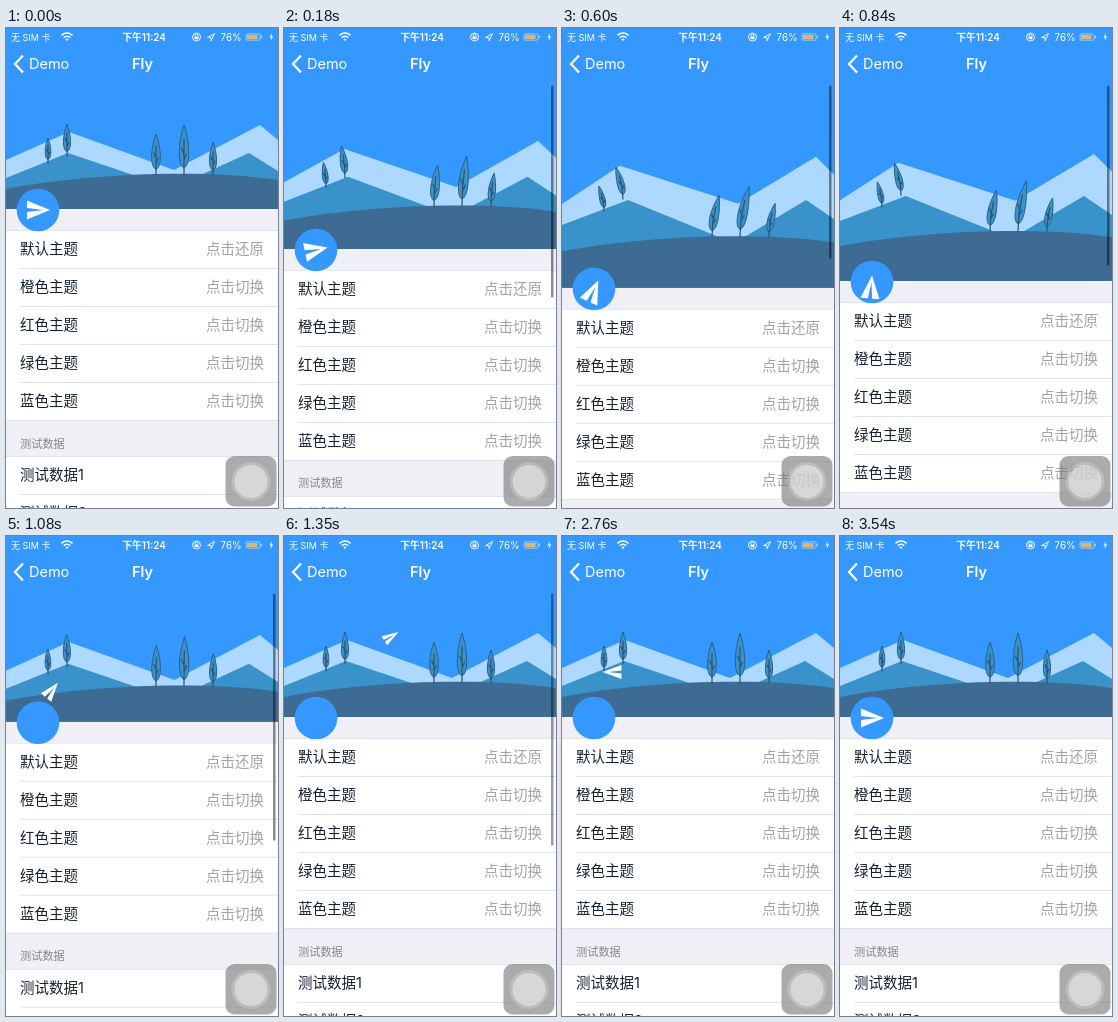
An HTML page for the animation above (3.57 s loop, 272 px wide and 480 px high).

```html
<!DOCTYPE html>
<html lang="zh-CN">
<head>
<meta charset="utf-8">
<title>Fly</title>
<style>
html, body { margin: 0; width: 100%; height: 100%; overflow: hidden; background: #f0eff6; }
svg { display: block; width: 272px; height: 480px; }
text { font-family: Inter, "Noto Sans CJK SC", "Noto Sans CJK", sans-serif; }
.row { font-size: 14.5px; fill: #15222e; }
.action { font-size: 14.5px; fill: #a1a3a7; text-anchor: end; }
.caption { font-size: 11.2px; fill: #85868b; }
.status { font-size: 9px; fill: #fff; }
.nav { font-size: 14.5px; fill: #fff; }
.line { stroke: #dde4ec; stroke-width: 1; }
.tree { fill: #3a92cb; stroke: #2c5f86; stroke-width: 1; stroke-linejoin: round; }
.trunk { fill: none; stroke: #2c5272; stroke-width: 1.2; stroke-linecap: round; }
</style>
</head>
<body>
<svg id="stage" viewBox="0 0 272 480">
  <rect width="272" height="480" fill="#f0eff6"/>
  <g id="list"></g>
  <rect id="sky" width="272" height="181" fill="#3498ff"/>
  <path id="far" fill="#add8ff"/>
  <path id="mid" fill="#3a92cb"/>
  <path id="hill" fill="#3d6b94"/>
  <g id="trees"></g>
  <circle id="button" cx="32" cy="182" r="21.3" fill="#3498ff"/>
  <path id="plane" fill="#fff" d="M2 21 23 12 2 3v7l15 2-15 2z"/>
  <rect id="bar" x="267" y="57.5" width="2.5" rx="1.25" fill="#000"/>

  <text class="status" x="5" y="12.5" textLength="">无 SIM 卡</text>
  <g fill="none" stroke="#fff" stroke-width="1.5">
    <path d="M55.5 7.3Q61 2.8 66.5 7.3M57.7 9.7Q61 7 64.3 9.7"/>
    <path d="M59.4 11.2 61 13l1.6-1.8q-1.6-1.2-3.2 0z" fill="#fff" stroke="none"/>
  </g>
  <text class="status" x="138" y="12.5" text-anchor="middle" style="font-size:9.8px;font-weight:600">下午11:24</text>
  <g fill="none" stroke="#fff" stroke-width=".9">
    <circle cx="190.5" cy="9" r="4"/>
    <path d="M189 8.6V7.6a1.5 1.5 0 0 1 3 0v1"/>
    <path d="M188.6 8.5h3.8v2.7h-3.8z" fill="#fff" stroke="none"/>
    <path d="M201.5 9.6 208.5 5.6 205 12.8V9.6z"/>
  </g>
  <text class="status" x="214.5" y="12.5" style="font-size:9.8px">76%</text>
  <rect x="240" y="5.8" width="14" height="6.4" rx="1.2" fill="none" stroke="#cfd8dd" stroke-width=".7"/>
  <rect x="241" y="6.8" width="10.5" height="4.4" fill="#d9b77a"/>
  <rect x="254.7" y="7.8" width="1.2" height="2.4" fill="#cfd8dd"/>
  <path d="M266 5 263.4 9.4h1.9L264.4 13 267.2 8.4h-1.9z" fill="#fff"/>
  <path d="M17 27.5 9 36l8 8.5" fill="none" stroke="#fff" stroke-width="2.2"/>
  <text class="nav" x="23" y="41">Demo</text>
  <text class="nav" x="136.5" y="41" text-anchor="middle" font-weight="600">Fly</text>

  <rect x="219.5" y="428" width="51" height="50.5" rx="9" fill="#808080" fill-opacity=".66"/>
  <circle cx="245" cy="453.5" r="19.5" fill="#fff" fill-opacity=".2"/>
  <circle cx="245" cy="453.5" r="16.5" fill="#fff" fill-opacity=".4"/>
</svg>
<script>
const LOOP = 3570, STEP = 30, FULL = 77, RELEASE = 813;
const $ = id => document.getElementById(id);
const lerp = (a, b, k) => a + (b - a) * k;

function add(parent, tag, attrs, text) {
  const el = document.createElementNS('http://www.w3.org/2000/svg', tag);
  for (const key in attrs) el.setAttribute(key, attrs[key]);
  if (text) el.textContent = text;
  parent.append(el);
  return el;
}

function section(top, labels, actions) {
  const list = $('list'), n = labels.length;
  add(list, 'rect', { y: top, width: 272, height: n * 38, fill: '#fff' });
  labels.forEach((label, i) => {
    const y = top + i * 38;
    add(list, 'text', { class: 'row', x: 14, y: y + 24 }, label);
    if (actions) add(list, 'text', { class: 'action', x: 258, y: y + 24 }, i ? '点击切换' : '点击还原');
    if (i) add(list, 'path', { class: 'line', d: `M14 ${y}.5H272` });
  });
  for (const y of [top, top + n * 38]) add(list, 'path', { class: 'line', d: `M0 ${y}.5H272` });
}
section(202, ['默认', '橙色', '红色', '绿色', '蓝色'].map(s => s + '主题'), true);
add($('list'), 'text', { class: 'caption', x: 14, y: 419.5 }, '测试数据');
section(428, ['测试数据1', '测试数据2']);

// Ridge points: x, y at rest, then x, y when pulled.
const FAR = [[0, 132, 0, 175], [63, 104, 58, 137], [168, 142, 176, 175], [254, 97, 254, 128], [272, 112, 272, 146]];
const MID = [[0, 150, 0, 196], [62, 125, 66, 171], [166, 160, 172, 214], [243, 125, 244, 171], [272, 143, 272, 190]];

// x, base at rest, base when pulled, height, lean, half width
const TREES = [
  [42, 135, 182, 25, -5, 3], [61, 128, 170, 32, -7, 3.8],
  [150, 147, 207, 41, 7, 4.6], [178, 147, 207, 50, 9, 5], [207, 147, 207, 33, 6, 3.8]
].map(spec => ({
  spec,
  leaf: add($('trees'), 'path', { class: 'tree' }),
  trunk: add($('trees'), 'path', { class: 'trunk' })
}));

// time, x, y, angle, scale x, scale y
const FLIGHT = [
  [0, 32.5, 182, 0, 1.1, 1.06],
  [390, 32, 182, -38, 1.1, 1.06],
  [840, 31, 187, -85, 1.1, 1.06],
  [930, 32, 180, -80, 1.08, 1],
  [1080, 46, 149.5, -51, .9, .74],
  [1330, 102, 103, -33, .8, .6],
  [1590, 185, 75, -14, .7, .44],
  [1830, 260, 64, 0, .63, .34],
  [1950, 296, 62, 0, .6, .3],
  [2080, 296, 66, 0, -.6, .4],
  [2760, 50, 136, 0, -.9, .77],
  [2940, -14, 164, 0, -1, .9],
  [3000, -16, 174, 0, 1, 1],
  [3240, 32.5, 182, 0, 1.1, 1.06],
  [LOOP, 32.5, 182, 0, 1.1, 1.06]
];
const PULL = [[0, 0], [30, 2], [210, 47], [390, 77], [520, 79], [RELEASE, 78]];

// Smooth keyframes that never overshoot.
function track(keys, t, c) {
  let i = 0;
  while (i < keys.length - 2 && t >= keys[i + 1][0]) i++;
  const slope = j => keys[j] && keys[j + 1]
    ? (keys[j + 1][c] - keys[j][c]) / (keys[j + 1][0] - keys[j][0]) : 0;
  const tangent = j => {
    const a = slope(j - 1), b = slope(j);
    return a * b > 0 ? 2 * a * b / (a + b) : 0;
  };
  const [a, b] = [keys[i], keys[i + 1]], h = b[0] - a[0];
  const u = Math.min(1, (t - a[0]) / h), v = 1 - u;
  return v * v * (1 + 2 * u) * a[c] + u * u * (1 + 2 * v) * b[c]
    + h * u * v * (v * tangent(i) - u * tangent(i + 1));
}

function pullAt(t) {
  if (t < RELEASE) return track(PULL, t, 1);
  const x = (t - RELEASE) * .0169, p = 78 * (1 + x) * Math.exp(-x);
  return p < .3 ? 0 : p;
}

function drawTree({ spec, leaf, trunk }, k) {
  const [x, rest, pulled, h, lean, w] = spec;
  const y = lerp(rest, pulled, k);
  const at = (u, side = 0) => `${x + lean * k * u * u + side * w} ${y - h * u}`;
  leaf.setAttribute('d', `M${at(.14)}C${at(.2, -1.3)} ${at(.62, -1.2)} ${at(1)}C${at(.62, 1.2)} ${at(.2, 1.3)} ${at(.14)}Z`);
  trunk.setAttribute('d', `M${at(0)}L${at(.35)} ${at(.72)}M${at(.3)}L${at(.42, .5)}M${at(.42)}L${at(.54, -.5)}`);
}

function draw(t) {
  const p = pullAt(t), k = p / FULL, bottom = 181 + p;
  const ridge = pts => 'M' + pts.map(([x, y, x2, y2]) => `${lerp(x, x2, k)} ${lerp(y, y2, k)}`).join('L') + `V${bottom}H0Z`;
  const drop = 61 * k;

  $('list').setAttribute('transform', `translate(0 ${p})`);
  $('sky').setAttribute('height', bottom);
  $('far').setAttribute('d', ridge(FAR));
  $('mid').setAttribute('d', ridge(MID));
  $('hill').setAttribute('d', `M0 ${161 + drop}C70 ${147 + drop} 190 ${140 + drop} 272 ${152 + drop}V${bottom}H0Z`);
  TREES.forEach(tree => drawTree(tree, k));

  $('button').setAttribute('cy', 182 + p);
  const [x, y, angle, sx, sy] = [1, 2, 3, 4, 5].map(c => track(FLIGHT, t, c));
  $('plane').setAttribute('transform',
    `translate(${x} ${y + p}) rotate(${angle}) scale(${sx} ${sy}) translate(-12.5 -12)`);

  $('bar').setAttribute('height', 252 - p);
  $('bar').setAttribute('opacity', .45 * Math.max(0, Math.min(1, t / 60, (1560 - t) / 240)));
}

function tick() {
  draw(Math.floor(performance.now() % LOOP / STEP) * STEP);
  requestAnimationFrame(tick);
}
tick();
</script>
</body>
</html>
```
